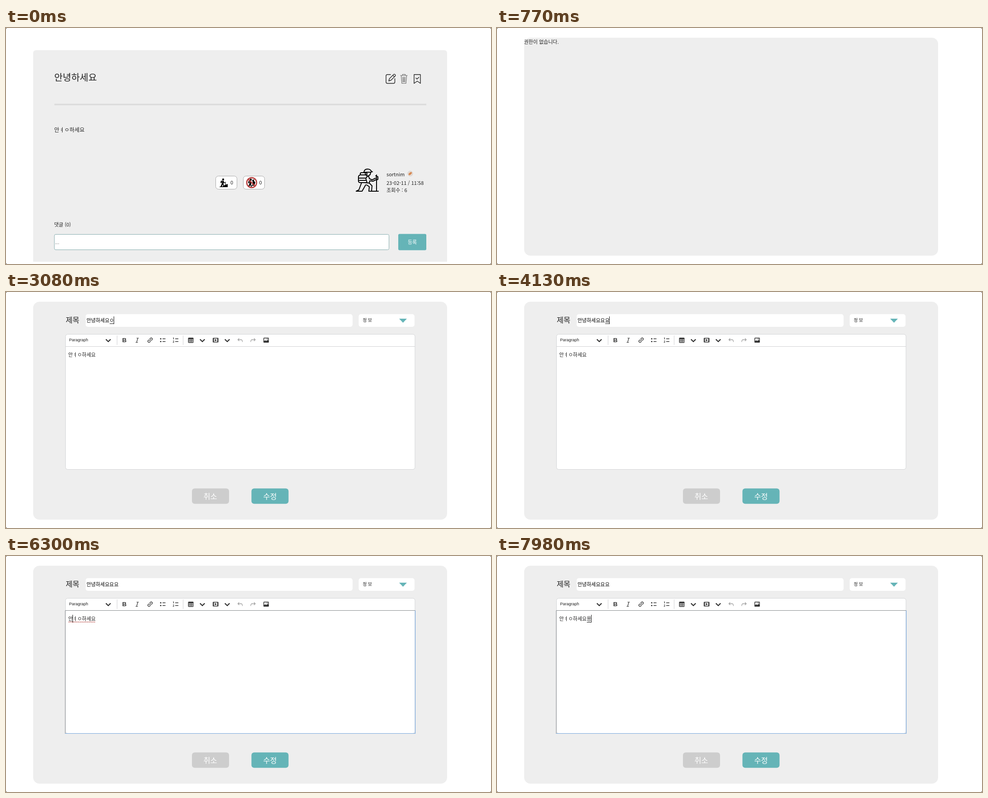
An HTML page that plays this animation: 1072 px wide and 522 px high, repeating every 8000 ms.

```html
<!DOCTYPE html>
<html lang="ko">
<head>
<meta charset="utf-8">
<title>게시글 수정</title>
<style>
  html, body { margin: 0; width: 100%; height: 100%; overflow: hidden; background: #fff; }
  svg { display: block; font: 11px "Noto Sans CJK KR", "Noto Sans CJK JP", "Noto Sans CJK", sans-serif; fill: #222; }
  .card { fill: #eee; }
  .white { fill: #fff; }
  .teal { fill: #65b4b7; }
  .line { fill: none; stroke: #222; stroke-width: 1.4; stroke-linecap: round; stroke-linejoin: round; }
  .frame { fill: #fff; stroke: #a9a9a9; }
  .big { font-size: 16.4px; font-weight: 500; }
  .mid { text-anchor: middle; fill: #fff; font-weight: 500; }
</style>
</head>
<body>
<svg width="1072" height="522" viewBox="0 0 1072 522">
  <defs>
    <path id="chevron" d="M-5.2-2.4 0 2.8 5.2-2.4" fill="none" stroke="#333" stroke-width="2.2"/>
    <path id="undo" d="M-2-4-5-1l3 3M-5-1H2Q5-1 5 4" fill="none" stroke="#a0a0a0" stroke-width="1.3"/>
    <g id="walker">
      <circle cx="8" cy="2" r="2.2"/>
      <path d="M6 4.5 9 5 10 8 13 9 12.5 10.2 9 9.5 8.8 12 10.5 18H8.5L7 13.5 4.5 18H2L5 11Z"/>
      <path d="M3 5 5.5 4.5 4.5 10 2 9.5Z"/>
    </g>
  </defs>

  <g id="post">
    <path class="card" d="M60 517V56q0-7 7-7H968q7 0 7 7V517Z"/>
    <text x="106.5" y="116.5" font-size="20.5">안녕하세요</text>
    <g class="line">
      <path d="M850 103h-7q-3 0-3 3v13.500q0 3 3 3h13.500q3 0 3-3V112M846 117l1.500-5 9.500-9.500q1.500-1 3 .5t.5 3L851 115.500ZM855 104.500l3.500 3.500"/>
      <path d="M902 103h14v19.500l-7-5-7 5ZM906 110.500l2.500 2.500 4-4"/>
      <path d="M872 105h15M876.500 105v-2.500h6v2.500M873.500 105.500 875 122.500h9l1.500-17M877 108.500l.5 11M879.500 108.500v11M882 108.500l-.5 11" stroke="#666" stroke-width="1.200"/>
    </g>
    <path d="M107 167.500h822v3.500H107Z" fill="#dcdcdc"/>
    <text x="106.500" y="229.500" font-size="12.200">안ㅕㅇ하세요</text>

    <rect class="frame" x="463.500" y="327.500" width="47" height="29" rx="6"/>
    <rect class="frame" x="524.500" y="327.500" width="47" height="29" rx="6"/>
    <g fill="#000">
      <use href="#walker" x="472" y="333"/>
      <path d="M472 352v-1l8-1 4-3 6-2v7Z"/>
      <path d="M485 340v9" stroke="#000"/>
      <use href="#walker" x="533" y="333.500"/>
      <path d="M544 336l5-1-1 3 3 3-2 8h-6l3-5Z"/>
    </g>
    <path d="M535 334l16 16" stroke="#b9403f" stroke-width="2.500"/>
    <circle cx="543" cy="342" r="10.900" fill="none" stroke="#b9403f" stroke-width="2.600"/>
    <text x="496" y="346">0</text>
    <text x="559.500" y="346">0</text>

    <g class="line" stroke-width="2" style="stroke:#000;stroke-width:2">
      <path d="M774 361h13l8-14M774 361l6-3 6-16M792 342l11 1 6 6-1 12h7M797 347l6 4-1 10h6M816 361h7"/>
      <path d="M791 319q1-7 8-7t9 6h2M791 319h16M794 320q0 7 6 7 5 0 6-7"/>
      <rect x="783" y="320" width="15" height="5" rx="2.500"/>
      <path d="M783 325q-4 1-4 5v8q0 4 4 4h13M780 332h14q4 0 4-5M781 337h15M798 327q5 1 5 6l6 3 8-4M795 332l3 10M803 342l1-4 7 1 8-4"/>
      <path d="M819 325v36M817 327l5 2v6l-3 1"/>
    </g>
    <text x="841" y="327.500">sortnim</text>
    <circle cx="893.500" cy="322" r="5.500" fill="#eadfd8" stroke="#d0cbc7"/>
    <ellipse cx="893.500" cy="322" rx="4.300" ry="2.500" fill="#d58a55" transform="rotate(-42 893.500 322)"/>
    <text x="841" y="347">23-02-11 / 11:58</text>
    <text x="841" y="363.300">조회수 : 6</text>
    <text x="106.500" y="438.500">댓글 (0)</text>
    <rect class="frame" x="107" y="456.500" width="739.500" height="34" rx="3" style="stroke:#86acae"/>
    <text x="108.500" y="478" fill="#777">...</text>
    <rect class="teal" x="867" y="455.500" width="62" height="36" rx="3"/>
    <text class="mid" x="898" y="478">등록</text>
  </g>

  <g id="page">
    <rect class="card" x="60" y="21.500" width="915" height="482" rx="14"/>
    <text id="denied" x="59.500" y="34.500">권한이 없습니다.</text>
    <g id="editor">
      <text x="132" y="68.300" class="big" style="font-weight:400">제목</text>
      <rect class="white" x="176" y="49" width="590" height="28" rx="5"/>
      <rect class="white" x="779.500" y="49" width="123.500" height="28" rx="5"/>
      <text x="788.500" y="66" font-size="9.700">정 보</text>
      <path class="teal" d="M869 59h17l-8.500 9Z"/>
      <rect class="frame" x="131.500" y="93.500" width="772.500" height="299" rx="5" style="stroke:#d3d4d6"/>
      <path d="M131.500 120.500H904M245.500 96v21M391.500 96v21" stroke="#d0d1d3"/>
      <text x="139.500" y="109.300" font-size="9" style="font-family:'Liberation Sans',Arial,sans-serif">Paragraph</text>

      <g fill="#333">
        <use href="#chevron" x="226" y="107"/>
        <use href="#chevron" x="434" y="107"/>
        <use href="#chevron" x="489" y="107"/>
        <text x="256.700" y="111.300" font-size="13.500" font-weight="700" style="font-family:'Liberation Sans',Arial,sans-serif">B</text>
        <path d="M288.500 102h5M286.500 111.500h5M291.300 102l-2.600 9.500" stroke="#333" stroke-width="1.200"/>
        <g transform="translate(318.500 106.500) rotate(-45)" fill="none" stroke="#333" stroke-width="1.300">
          <path d="M-1-2.500h-2.500a2.500 2.500 0 0 0 0 5H-.5M1 2.500h2.500a2.500 2.500 0 0 0 0-5H.5M-2.500 0h5"/>
        </g>
        <circle cx="342" cy="103.500" r="1.500"/>
        <circle cx="342" cy="109.500" r="1.500"/>
        <path d="M346 103.500h6.500M346 109.500h6.500M374 103.500h7M374 109.500h7" stroke="#333" stroke-width="1.300"/>
        <path d="M369 102l1.500-1v4M369 108h2v1.500l-2 2h2.500" fill="none" stroke="#333"/>
        <rect x="402.500" y="101" width="12" height="11.500" rx="1.500"/>
        <path d="M404 104.500h2.500v1.500h-2.500ZM407.500 104.500h2.500v1.500h-2.500ZM411 104.500h2.500v1.500h-2.500ZM404 107h2.500v1.500h-2.500ZM407.500 107h2.500v1.500h-2.500ZM411 107h2.500v1.500h-2.500ZM404 109.500h2.500v1.500h-2.500ZM407.500 109.500h2.500v1.500h-2.500ZM411 109.500h2.500v1.500h-2.500Z" fill="#fff"/>
        <rect x="457" y="101.500" width="12.500" height="10" rx="1"/>
        <path class="white" d="M459.500 103h7.500v7h-7.500Z"/>
        <path d="M461.500 103.700l4.500 2.800-4.500 2.800Z"/>
        <use href="#undo" x="517.500" y="106.500"/>
        <use href="#undo" transform="translate(546 106.500) scale(-1 1)"/>
        <rect x="569" y="101" width="12" height="11" rx="1.500"/>
        <path class="white" d="M570.500 102.500h9v5l-2-1.500-2.500 2.500-2-2-2.500 2.500Z"/>
        <circle cx="577.300" cy="104.300" r="1"/>
      </g>

      <g id="focus" fill="none">
        <path d="M131 393V120.500H904.500" stroke="#85898d"/>
        <path d="M904.500 120.500V392.500H130.500" stroke="#74a5dc" stroke-width="1.200"/>
      </g>
      <text id="title" x="178" y="67" font-weight="500" style="fill:#000"></text>
      <text id="body" x="137.500" y="143.300"></text>
      <path id="spelling" d="M138 146H198" stroke="#b5443f" stroke-width="1.400" stroke-dasharray="1.500 1"/>
      <rect id="composing" width="9.500" height="1" fill="#111"/>
      <rect id="caret" width="1" height="17" fill="#111"/>
      <path id="pointer" class="line" style="stroke-width:1" d="M438 155.500q2 0 2 2v12q0 2-2 2M442 155.500q-2 0-2 2v12q0 2 2 2"/>

      <rect x="411" y="434.500" width="82" height="34" rx="6" fill="#cdcdcd"/>
      <rect class="teal" x="542.500" y="434.500" width="82" height="34" rx="6"/>
      <text class="mid big" x="451.500" y="458.300">취소</text>
      <text class="mid big" x="583.500" y="458.300">수정</text>
    </g>
  </g>
  <path d="M0 0h2L0 2ZM1072 0v2l-2-2ZM0 522v-2l2 2ZM1072 522h-2l2-2Z" fill="#555"/>
</svg>

<script>
const LOOP = 8000, OPEN = 770, READY = 910, BODY = 5180;
const ADVANCE = 10.12;  // width of one syllable at 11px

// [time, typed suffix, caret index (-1 hidden), composing the last syllable]
const steps = [
  [0, '', -1], [2310, '', 5], [2870, '', -1],
  [3080, 'ㅇ', 6, true], [3710, 'ㅇ', -1, true],
  [3920, '요', 6, true], [3990, '용', 6, true],
  [4130, '요요', 7, true], [4690, '요요', -1, true],
  [BODY, '', 0], [5740, '', -1], [6300, '', 1], [6440, '', 2],
  [6860, '', 3], [6930, '', 5], [7000, '', 6], [7490, '', -1],
  [7770, 'ㅇ', 7, true], [7910, '요', 7, true], [7980, '용', 7, true]
];

const el = id => document.getElementById(id);
const show = (id, on) => { el(id).style.display = on ? '' : 'none'; };
const place = (id, x, y) => { el(id).setAttribute('x', x); el(id).setAttribute('y', y); };
const write = (id, text) => { if (el(id).textContent !== text) el(id).textContent = text; };

function draw(t) {
  const [, suffix, caret, composing] = steps.findLast(step => step[0] <= t);
  const inBody = t >= BODY;
  const title = '안녕하세요' + (inBody ? '요요' : suffix);
  const body = '안ㅕㅇ하세요' + (inBody ? suffix : '');
  const left = inBody ? 137.5 : 178;
  const top = inBody ? 130 : 54;
  const length = (inBody ? body : title).length;

  show('post', t < OPEN);
  show('page', t >= OPEN);
  show('denied', t < READY);
  show('editor', t >= READY);
  show('focus', inBody);
  show('spelling', inBody && t < 7910);
  show('pointer', t >= 7630 && t < 7770);
  show('caret', caret >= 0);
  show('composing', composing);
  write('title', title);
  write('body', body);
  place('caret', Math.floor(left + caret * ADVANCE), top);
  place('composing', left + (length - 1) * ADVANCE + 0.4, top + (inBody ? 16 : 15.5));
}

const start = performance.now();
function tick() {
  draw((performance.now() - start) % LOOP);
  requestAnimationFrame(tick);
}
tick();
</script>
</body>
</html>
```
